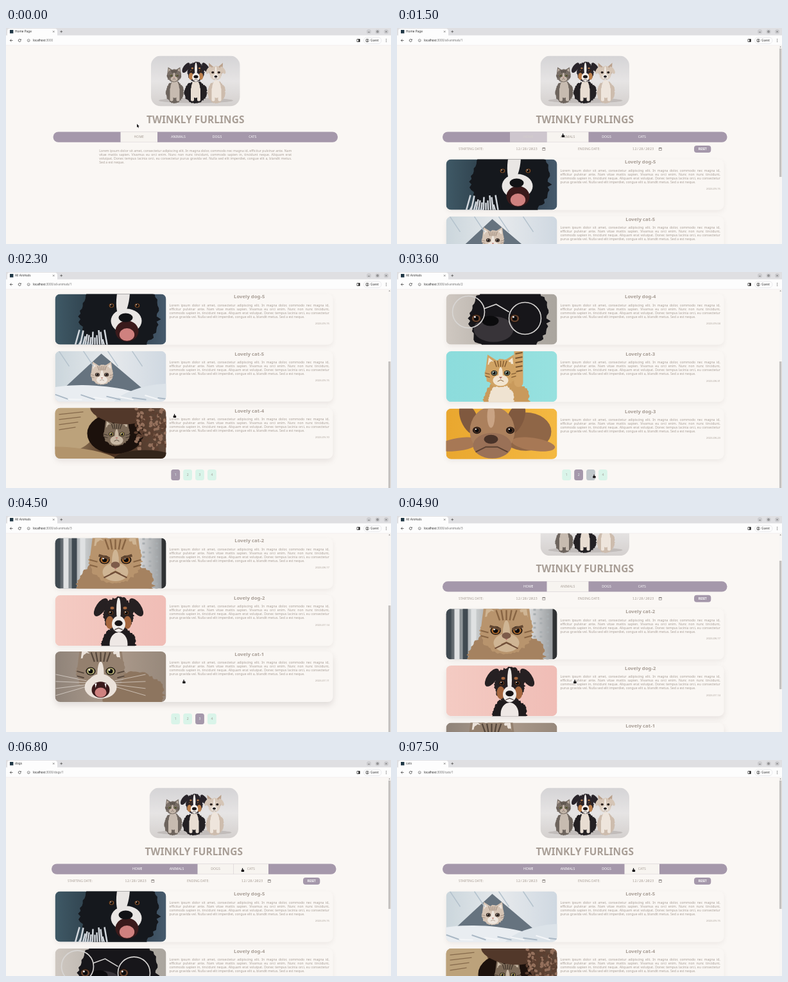
These frames come from a looping animation (600x338 px, 8000 ms). An HTML page with a canvas:

```html
<!DOCTYPE html>
<html lang="en">
<head>
<meta charset="utf-8">
<title>Animal pages</title>
<style>
  html, body { margin: 0; width: 100%; height: 100%; overflow: hidden; background: #faf7f4; }
  canvas { display: block; width: 100vw; height: 100vh; }
</style>
</head>
<body>
<canvas id="stage" width="600" height="338"></canvas>
<script>
const ctx = document.getElementById('stage').getContext('2d');
const LOOP = 8000, TICK = 100, MAX_SCROLL = 171;
const PAGE = '#faf7f4', PURPLE = '#a598ab', CREAM = '#f7f4f0', MINT = '#d9f4e9', INK = '#a89e96';

// ---------- drawing helpers ----------
const noise = i => Math.abs(Math.sin(i * 12.9898) * 43758.5453) % 1;
const times = (n, draw) => { for (let i = 0; i < n; i++) draw(i); };
const bothSides = draw => { draw(-1); draw(1); };
function fill(color) { ctx.fillStyle = color; ctx.fill(); }
function stroke(color, width) { ctx.strokeStyle = color; ctx.lineWidth = width; ctx.stroke(); }
function path(points) {
  ctx.beginPath();
  for (let i = 0; i < points.length; i += 2) ctx.lineTo(points[i], points[i + 1]);
}
function poly(color, ...points) { path(points); fill(color); }
function line(color, width, ...points) { path(points); stroke(color, width); }
function oval(color, x, y, rx, ry = rx, turn = 0) {
  ctx.beginPath(); ctx.ellipse(x, y, rx, ry, turn, 0, 7); fill(color);
}
function ring(color, width, x, y, r) { ctx.beginPath(); ctx.arc(x, y, r, 0, 7); stroke(color, width); }
function box(color, x, y, w, h, r = 0) { ctx.beginPath(); ctx.roundRect(x, y, w, h, r); fill(color); }
function cross(x, y, r) {
  bothSides(s => line('#444', .6, x - r, y - s * r, x + r, y + s * r));
}
function mix(a, b, k) {
  const part = (c, i) => parseInt(c.slice(i, i + 2), 16);
  return `rgb(${[1, 3, 5].map(i => Math.round(part(a, i) + (part(b, i) - part(a, i)) * k))})`;
}

// Text is laid out at ten times its size so small glyphs keep exact advances.
function text(str, x, y, size, color, { align = 'left', weight = 400, font = '"Noto Sans", sans-serif', width } = {}) {
  ctx.save();
  ctx.translate(x, y + size * .357);
  ctx.scale(.1, .1);
  ctx.font = `${weight} ${size * 10}px ${font}`;
  ctx.textAlign = align;
  ctx.fillStyle = color;
  const used = ctx.measureText(str).width / 10;
  if (width) ctx.wordSpacing = `${(width - used) * 10 / (str.split(' ').length - 1)}px`;
  ctx.fillText(str, 0, 0);
  ctx.restore();
  return used;
}
function paragraph(lines, x, y, width) {
  lines.forEach((str, i) =>
    text(str, x, y + i * 6, 5.1, INK, { width: i < lines.length - 1 && width }));
}

// ---------- animals, painted in a 173 x 79 box ----------
function picture(x, y, w, h, r, paint) {
  ctx.save();
  ctx.beginPath(); ctx.roundRect(x, y, w, h, r); ctx.clip();
  ctx.translate(x, y);
  paint();
  ctx.restore();
}
function backdrop(...colors) {
  const g = ctx.createLinearGradient(0, 0, 173, 0);
  colors.forEach((c, i) => g.addColorStop(i / (colors.length - 1), c));
  box(g, 0, 0, 173, 79);
}
function fluff(color, x, y, rx, ry) {
  ctx.beginPath();
  times(90, i => {
    const a = i / 90 * 2 * Math.PI, k = .94 + .12 * noise(i);
    ctx.lineTo(x + Math.cos(a) * rx * k, y + Math.sin(a) * ry * k);
  });
  fill(color);
}
function eyes(color, x, y, gap, r) {
  bothSides(s => {
    oval('#1a1412', x + s * gap, y, r * 1.2, r);
    oval(color, x + s * gap, y, r * .95, r * .8);
    oval('#0b0b0c', x + s * gap, y, r * .55);
    oval('#fff', x + s * gap - r * .3, y - r * .3, r * .2);
  });
}
function openMouth(x, y, r) {
  oval('#3a1a1b', x, y, r, r * .9);
  oval('#cf817f', x, y + r * .3, r * .65, r * .55);
}
function catHead(x, y, r, fur, pale, dark, iris) {
  bothSides(s => {
    poly(fur, x + s * r, y, x + s * r * .85, y - r * 1.2, x + s * r * .15, y - r * .75);
    poly(pale, x + s * r * .85, y - r * .4, x + s * r * .77, y - r, x + s * r * .4, y - r * .7);
  });
  fluff(fur, x, y, r * 1.03, r * .9);
  times(5, i => line(dark, r * .06, x + (i - 2) * r * .2, y - r * .8, x + (i - 2) * r * .13, y - r * .4));
  bothSides(s => times(2, i => line(dark, r * .05, x + s * r, y + i * r * .2, x + s * r * .7, y + i * r * .2 + r * .08)));
  oval(pale, x, y + r * .1, r * .14, r * .5);
  oval(pale, x, y + r * .48, r * .5, r * .36);
  eyes(iris, x, y, r * .42, r * .17);
  poly('#b9796f', x - r * .11, y + r * .25, x + r * .11, y + r * .25, x, y + r * .38);
  line(dark, r * .04, x - r * .2, y + r * .55, x, y + r * .45, x + r * .2, y + r * .55);
}
function dogHead(x, y, r, coat, pale, patch, iris) {
  bothSides(s => oval(coat, x + s * r * 1.1, y - r * .45, r * .3, r * .65, -s * .6));
  fluff(coat, x, y, r * .95, r * 1.1);
  bothSides(s => {
    oval(patch, x + s * r * .55, y + r * .5, r * .25, r * .4);
    oval(patch, x + s * r * .4, y - r * .4, r * .12, r * .09);
  });
  oval(pale, x, y - r * .3, r * .14, r * .75);
  oval(pale, x, y + r * .6, r * .42, r * .5);
  eyes(iris, x, y - r * .1, r * .48, r * .17);
  oval('#171315', x, y + r * .55, r * .25, r * .18);
  line('#4c3e3c', r * .05, x - r * .25, y + r * .95, x, y + r * .85, x + r * .25, y + r * .95);
}

const photos = {
  'dog-5'() {
    backdrop('#3f5966', '#26343f', '#465a6c');
    fluff('#15181d', 100, 35, 62, 62);
    times(14, i => line('#d3d8de', 2.5, 30 + i * 4, 85, 38 + i * 3, 56 + noise(i) * 18));
    oval('#e9e6e4', 106, 4, 10, 32, .12);
    oval('#e9e6e4', 111, 42, 24, 19);
    openMouth(112, 58, 18);
    oval('#111215', 110, 37, 11, 7);
    eyes('#7a4d2c', 108, 18, 20, 4);
  },
  'cat-5'() {
    backdrop('#cbd6dc', '#e6e9ec', '#cfd8e1');
    poly('#66737f', 14, 58, 72, 4, 140, 62, 80, 70);
    catHead(73, 37, 17, '#d5c4b5', '#eee6de', '#9c887a', '#6d584c');
    oval('#e9edf1', 60, 80, 95, 26, .06);
    oval('#dce3e9', 150, 76, 62, 22, -.2);
    times(9, i => line(i % 2 ? '#f4f6f8' : '#aab8c5', 2, i * 20, 68 + noise(i) * 8, i * 20 + 22, 76));
    times(4, i => line('#b4c2cd', 1.5, 6 + i * 38, 0, 22 + i * 38, 24));
  },
  'cat-4'() {
    backdrop('#b99e77', '#4a3020', '#60483a');
    oval('#bca27b', 18, 24, 48, 44);
    times(4, i => line('#85694b', 1.2, 6, 10 + i * 8, 44 - i * 4, 6 + i * 8));
    oval('#1c110c', 94, 40, 44, 32);
    catHead(96, 41, 20, '#7c6a58', '#c8b8a4', '#3d3229', '#b6a45c');
    oval('#52382a', 96, 6, 42, 18, .2);
    times(150, i => oval(i % 2 ? '#94705c' : '#5c3f30', 126 + noise(i) * 50, noise(i + 200) * 66, 3, 2, i));
    oval('#b2946c', 28, 80, 74, 18, .1);
    oval('#33251a', 140, 80, 48, 14);
  },
  'dog-4'() {
    backdrop('#cfc8c1', '#b5afa8', '#aaa59e');
    fluff('#17161a', 98, 38, 62, 60);
    oval('#383439', 74, 55, 31, 20);
    oval('#0b0b0d', 69, 42, 13, 8);
    eyes('#69432d', 77, 38, 30, 7);
    bothSides(s => ring('#d8d6d4', 1.6, 79 + s * 44, 33 + s * 5, 25));
    line('#d8d6d4', 1.6, 59, 23, 78, 16, 98, 28);
  },
  'cat-3'() {
    backdrop('#8cdcdc', '#97e1df');
    fluff('#c99a5c', 94, 76, 36, 32);
    box('#d3a567', 106, -10, 14, 66, 7);
    times(5, i => line('#76552f', 2, 108, 4 + i * 7, 119, 2 + i * 7));
    fluff('#efe3d1', 86, 76, 20, 24);
    catHead(85, 34, 24, '#d0a364', '#f2e5d0', '#80592f', '#6f806c');
  },
  'dog-3'() {
    backdrop('#e9a72f', '#f4b942');
    oval('#8f6647', 124, 36, 40, 30);
    bothSides(s => {
      oval('#a77855', 78 + s * 58, 56, 34, 10, s * .15);
      oval('#80593f', 72 + s * 36, 16, 13, 26, s * .4);
    });
    oval('#ab805d', 72, 35, 35, 38);
    oval('#c9a384', 70, 12, 6, 18);
    oval('#9a7157', 72, 58, 30, 20);
    oval('#493329', 70, 48, 11, 7);
    line('#5b4132', 2, 46, 68, 62, 60, 80, 60, 96, 68);
    eyes('#4b2f20', 74, 34, 26, 5.5);
  },
  'cat-2'() {
    backdrop('#3f484e', '#ced2d4', '#8d8a86', '#d9dadb', '#8b8f92');
    times(4, i => box(i % 2 ? '#dfe1e2' : '#404a51', i * 13, 0, 8, 79));
    times(24, i => box('#a9aeb1', 136 + i % 3 * 10, (i >> 1) * 7, 4, 3));
    box('#2f3133', 166, 0, 7, 79);
    fluff('#a58260', 94, 72, 60, 38);
    catHead(94, 34, 40, '#b8946d', '#cfb594', '#876443', '#a8672a');
    bothSides(s => line('#644832', 4, 94 + s * 26, 27, 94 + s * 9, 32));
    oval('#7d5b49', 94, 42, 7, 5);
    line('#6f4d38', 2, 76, 62, 94, 53, 112, 62);
  },
  'dog-2'() {
    backdrop('#f4cbc3', '#f0bdb6');
    fluff('#1f1b1d', 99, 76, 27, 26);
    oval('#eee8e5', 99, 76, 14, 18);
    dogHead(99, 30, 25, '#262022', '#f1ece9', '#a5663e', '#54331f');
  },
  'cat-1'() {
    backdrop('#8f8379', '#ad9c8d', '#97887b');
    fluff('#8d755f', 120, 66, 50, 34);
    catHead(71, 31, 37, '#94806e', '#ebe2da', '#55463b', '#b4ad73');
    oval('#ebe2da', 71, 56, 25, 18);
    openMouth(71, 60, 14);
    bothSides(s => {
      poly('#fff', 71 + s * 9, 50, 71 + s * 6, 50, 71 + s * 8, 57);
      times(4, i => line('#f4eeea', .6, 71 + s * 22, 46 + i * 3, 71 + s * 70, 36 + i * 11));
    });
  },
  trio() {
    const g = ctx.createLinearGradient(0, 0, 0, 79);
    ['#d5d4d6', '#e6e4e4', '#d4d0ce'].forEach((c, i) => g.addColorStop(i / 2, c));
    box(g, 0, 0, 140, 79);
    oval('#c1bcba', 70, 70, 58, 4);
    [['#6d645d', '#c7bbb0'], ['#232023', '#e8ddd2'], ['#cdbcad', '#eee5dc']].forEach(([coat, chest], i) => {
      const x = 37 + i * 32.5;
      fluff(coat, x, 57, 14 + i % 2 * 4, 17);
      oval(chest, x, 52, 7, 14);
      bothSides(s => box(chest, x + s * 5 - 2.5, 50, 5, 21, 2));
    });
    catHead(36, 31, 11, '#786e66', '#c5b7aa', '#3a3430', '#b0ad67');
    dogHead(70, 25, 14, '#29242a', '#f4efea', '#bd814d', '#6a432d');
    bothSides(s => poly('#bba18c', 101 + s * 11, 11, 101 + s * 3, 18, 101 + s * 10, 29));
    dogHead(101, 27, 10, '#d5c5b6', '#f0e9e2', '#dccfc2', '#49352d');
  }
};

// ---------- timeline ----------
const POSTS = {
  'dog-5': '2023-09-15', 'cat-5': '2023-09-15', 'cat-4': '2023-09-10',
  'dog-4': '2023-09-04', 'cat-3': '2023-08-31', 'dog-3': '2023-08-23',
  'cat-2': '2023-08-17', 'dog-2': '2023-07-14', 'cat-1': '2023-07-11'
};
const VIEWS = [
  { at: 0, tab: 0, page: 0 },
  { at: 1400, tab: 1, page: 1, list: 'all-animals', kind: '' },
  { at: 2900, tab: 1, page: 2, list: 'all-animals', kind: '' },
  { at: 3800, tab: 1, page: 3, list: 'all-animals', kind: '' },
  { at: 5900, tab: 2, page: 1, list: 'dogs', kind: 'dog' },
  { at: 7000, tab: 3, page: 1, list: 'cats', kind: 'cat' }
];
const TITLES = [
  { at: 0, name: 'Home Page' }, { at: 1600, name: 'All Animals' },
  { at: 6100, name: 'dogs' }, { at: 7200, name: 'cats' }
];
// Each move eases to its place between two times.
const MOVES = [
  { from: 600, to: 1300, x: 258.5, y: 165 },
  { from: 1500, to: 1900, x: 262.5, y: 222 },
  { from: 2400, to: 2800, x: 283, y: 317 },
  { from: 3200, to: 3600, x: 307, y: 316.5 },
  { from: 4000, to: 4400, x: 277, y: 256 },
  { from: 5000, to: 5600, x: 326.5, y: 171 },
  { from: 6100, to: 6600, x: 368.5, y: 169 }
];
const SCROLLS = [{ from: 1700, to: 2200, y: MAX_SCROLL }, { from: 4600, to: 5100, y: 0 }];

function track(start, moves, key, t) {
  return moves.reduce((value, move) => {
    const u = Math.min(1, Math.max(0, (t - move.from) / (move.to - move.from)));
    return value + (move[key] - value) * u * u * (3 - 2 * u);
  }, start);
}
const latest = (list, t) => list.findLast(item => item.at <= t);
function stateAt(t) {
  return {
    x: track(204, MOVES, 'x', t), y: track(150, MOVES, 'y', t),
    scroll: track(0, SCROLLS, 'y', t), view: latest(VIEWS, t)
  };
}
// Transition amount: share of the last few ticks in which the test held.
function fade(t, test) {
  return [0, 1, 2, 3].filter(k => test(stateAt(Math.max(0, t - k * TICK)))).length / 4;
}
const over = (s, [x, y, w, h]) =>
  s.x >= x && s.x < x + w && s.y + s.scroll >= y && s.y + s.scroll < y + h;

// ---------- page ----------
const TABS = [['HOME', 176, 57.5], ['ANIMALS', 233.5, 65], ['DOGS', 298.5, 56], ['CATS', 354.5, 54.5]]
  .map(([label, x, w]) => ({ label, area: [x, 162.5, w, 16.3] }));
const cardArea = i => [76.5, 205.5 + i * 89.6, 433, 79.2];
const pageArea = i => [257.3 + i * 18.9, 480, 13.8, 17];

const COPY = ['Lorem ipsum dolor sit amet, consectetur adipiscing elit. In magna dolor, commodo nec magna id,',
  'efficitur pulvinar ante. Nam vitae mattis sapien. Vivamus eu orci enim. Nunc non nunc tincidunt,',
  'commodo sapien in, tincidunt neque. Aliquam erat volutpat. Donec tempus lacinia orci, eu consectetur',
  'purus gravida vel. Nulla sed elit imperdiet, congue elit a, blandit metus. Sed a est neque.'];
const WIDE_COPY = COPY.join(' ').split(/(?<=Nam) | (?=volutpat)| (?=Sed a)/);

function drawHeader(t) {
  picture(223.5, 43.5, 138.5, 79, 15, photos.trio);
  text('TWINKLY FURLINGS', 292.7, 143, 15.5, INK, { align: 'center', weight: 700 });
  box(PURPLE, 71, 162.5, 443.5, 16.3, 8.1);
  TABS.forEach(({ label, area }, i) => {
    const [x, y, w, h] = area, k = fade(t, s => s.view.tab === i || over(s, area));
    if (k) box(mix(PURPLE, CREAM, k), x, y, w, h);
    text(label, x + w / 2, 170.5, 5.2, mix('#ffffff', INK, k), { align: 'center' });
  });
}
function drawFilters() {
  [['STARTING DATE:', 96, 185.3], ['ENDING DATE:', 282, 366.8]].forEach(([label, x, dateX]) => {
    text(label, x, 189.5, 5.1, INK);
    text('12/28/2023', dateX, 189.5, 5.6, INK, { font: '"Noto Sans Mono", monospace' });
    ctx.beginPath(); ctx.rect(dateX + 41.5, 187.7, 4, 3.8); stroke('#77716d', .6);
    box('#77716d', dateX + 41.5, 187.3, 4, 1.2);
  });
  box(PURPLE, 463, 184, 26.3, 11, 4);
  text('RESET', 476.2, 189.5, 4.4, '#ffffff', { align: 'center', weight: 700 });
}
function drawCard(name, i, t) {
  const area = cardArea(i), [x, top, w, h] = area;
  const lift = fade(t, s => s.view.page && over(s, area)), y = top - lift * 1.8;
  ctx.save();
  ctx.shadowColor = `rgba(110,100,100,${.09 + lift * .09})`;
  ctx.shadowBlur = 7 + lift * 3;
  ctx.shadowOffsetY = 3 + lift * 2;
  box(PAGE, x, y, w, h, 8);
  ctx.restore();
  picture(x, y, 173, h, 8, photos[name]);
  text('Lovely ' + name, 379.2, y + 4.2, 7.75, INK, { align: 'center', weight: 700 });
  paragraph(COPY, 254.5, y + 17.4, 249.3);
  text(POSTS[name], 504, y + 46, 4.2, INK, { align: 'right' });
}
function drawPager(t) {
  times(4, i => {
    const area = pageArea(i), [x, y, w, h] = area;
    const k = fade(t, s => s.view.page === i + 1 || over(s, area));
    box(mix(MINT, PURPLE, k), x, y, w, h, 3.5);
    text(String(i + 1), x + w / 2, y + h / 2, 5.1, mix('#a39d99', '#e3f4ee', k), { align: 'center' });
  });
}
function drawPage(t, { scroll, view }) {
  box(PAGE, 0, 0, 600, 338);
  ctx.save();
  ctx.translate(view.page ? 0 : 2.5, -scroll);
  drawHeader(t);
  if (view.page) {
    drawFilters();
    Object.keys(POSTS).filter(name => name.startsWith(view.kind))
      .slice(view.page * 3 - 3, view.page * 3).forEach((name, i) => drawCard(name, i, t));
    drawPager(t);
  } else paragraph(WIDE_COPY, 142.7, 192.3, 300);
  ctx.restore();
  if (view.page) {
    box('#f8f6f4', 595, 27, 5, 311);
    poly('#8a8785', 596.3, 30.3, 598.9, 30.3, 597.6, 28.6);
    box('#c4c1bf', 595.9, 32 + scroll / MAX_SCROLL * 108, 3.4, 201);
  }
}

// ---------- browser frame and pointer ----------
function drawBrowser(t, view) {
  box('#dfdfe2', 0, 0, 600, 12);
  box('#fdfdfd', 2, 1, 78, 14, 4);
  box('#fdfdfd', 0, 11.5, 600, 15.5);
  box('#e6e4e3', 0, 26.7, 600, .6);
  box('#1f3745', 6, 3, 5.4, 5.4);
  text(latest(TITLES, t).name, 14, 5.7, 4.75, '#333333');
  cross(74.2, 5.6, 1.2);
  box('#444', 84.3, 5.4, 3.8, .7);
  box('#444', 85.8, 3.8, .7, 3.8);
  times(3, i => oval('#cdcdd0', 565.5 + i * 13.5, 5.7, 3.6));
  box('#444', 564.2, 6.2, 2.6, .6);
  ctx.beginPath(); ctx.rect(577.9, 4.6, 2.2, 2.2); stroke('#444', .6);
  cross(592.5, 5.7, 1.1);

  line('#444', .8, 10.5, 19.5, 6.3, 19.5);
  line('#444', .8, 8.3, 17.5, 6.3, 19.5, 8.3, 21.5);
  ctx.beginPath(); ctx.arc(21.2, 19.5, 2, .3, 5.6); stroke('#444', .8);
  poly('#444', 23.6, 17, 23.6, 19.2, 21.5, 19.2);
  ring('#555', .6, 35.2, 19.5, 2);
  box('#555', 34.9, 19.2, .6, 1.5);
  const host = text('localhost', 42, 19.5, 4.6, '#222222');
  const route = view.page ? `/${view.list}/${view.page}` : '';
  text(':3000' + route, 42 + host, 19.5, 4.6, '#6d6d6d');

  ctx.beginPath(); ctx.rect(547, 17.5, 4.2, 4); stroke('#222', .7);
  box('#222', 549.2, 17.3, 2.2, 4.4);
  ctx.beginPath(); ctx.roundRect(557.5, 14.6, 27.5, 10, 5); stroke('#dedee1', .6);
  ring('#444', .6, 563, 19.5, 2.5);
  oval('#444', 563, 18.7, .9);
  oval('#444', 563, 20.9, 1.5, .7);
  text('Guest', 568, 19.5, 4.7, '#333333');
  times(3, i => oval('#444', 592.5, 17.5 + i * 2, .55));
}
function drawPointer(s) {
  const areas = TABS.map(tab => tab.area);
  if (s.view.page) times(4, i => areas.push(pageArea(i), cardArea(i % 3)));
  ctx.save();
  ctx.translate(s.x, s.y);
  if (areas.some(area => over(s, area))) {
    ctx.beginPath();
    ctx.roundRect(-.6, 0, 1.3, 4.5, .6);
    ctx.roundRect(-1.9, 2.4, 4.6, 3.7, 1.2);
  } else {
    path([0, 0, 0, 5.6, 1.3, 4.5, 2.2, 6.4, 3, 6, 2.2, 4.2, 3.8, 4]);
    ctx.closePath();
  }
  stroke('#ffffff', .8);
  fill('#1c1a1b');
  ctx.restore();
}

function frame(now) {
  const t = Math.floor(now % LOOP / TICK) * TICK, state = stateAt(t);
  drawPage(t, state);
  drawBrowser(t, state.view);
  drawPointer(state);
  requestAnimationFrame(frame);
}
requestAnimationFrame(frame);
</script>
</body>
</html>
```
